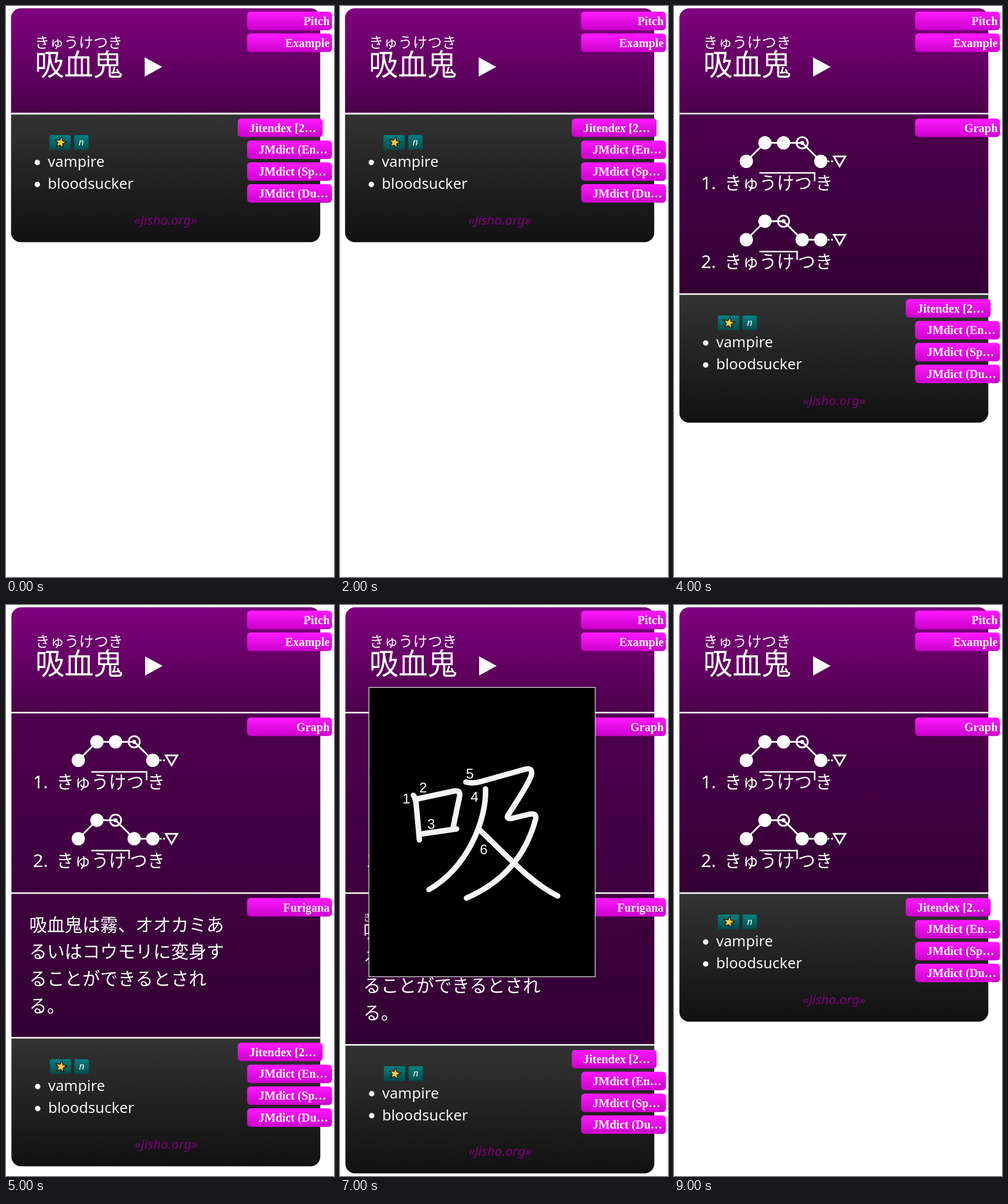
Write an HTML page with a canvas that moves like this. It is 568 px wide and 987 px high and loops after 10000 ms.

```html
<!DOCTYPE html>
<html lang="ja">
<head>
<meta charset="utf-8">
<title>Dictionary card</title>
<style>
html, body { margin: 0; width: 100%; height: 100%; overflow: hidden; background: #fff; }
canvas { display: block; width: 568px; height: 987px; }
</style>
</head>
<body>
<canvas id="stage" width="568" height="987"></canvas>
<script>
const ctx = document.getElementById('stage').getContext('2d');
const JP = '"Noto Sans CJK JP", "Noto Sans CJK", sans-serif';
const LATIN = '"Noto Sans", sans-serif';
const SERIF = '"Liberation Serif", serif';
const SANS = '"Liberation Sans", sans-serif';

// One state per second; "end" is the line above the definitions.
const closed = { end: 186, x: 8.5 };
const pitch = { end: 366, x: 9.2, pitch: true };
const graph = { ...pitch, end: 498, graph: true };
const example = { ...graph, end: 748, example: true };
const ruby = { ...example, end: 759.3, ruby: true };
const strokes = { ...ruby, end: 760.3, popup: true };
const timeline = [closed, closed, closed, pitch, graph, example, ruby, strokes, ruby, graph];

function vertical(y0, y1, from, to) {
  const g = ctx.createLinearGradient(0, y0, 0, y1);
  g.addColorStop(0, from);
  g.addColorStop(1, to);
  return g;
}

function text(str, x, y, font, color = '#fff', align = 'left') {
  ctx.font = font;
  ctx.fillStyle = color;
  ctx.textAlign = align;
  ctx.fillText(str, x, y);
}

// Japanese text centred vertically on cy
function kana(str, x, cy, size) {
  text(str, x, cy + size * 0.38, `${size}px ${JP}`);
}

function box(x, y, w, h, r, fill) {
  ctx.beginPath();
  ctx.roundRect(x, y, w, h, r);
  ctx.fillStyle = fill;
  ctx.fill();
}

function dot(x, y, r) {
  ctx.beginPath();
  ctx.arc(x, y, r, 0, Math.PI * 2);
  ctx.fillStyle = '#fff';
  ctx.fill();
}

function stroke(path, width, color = '#fff') {
  ctx.lineWidth = width;
  ctx.strokeStyle = color;
  ctx.stroke(new Path2D(path));
}

function tab(label, y, x = 417.5) {
  box(x, y, 147, 32, 6, vertical(y, y + 32, '#ff1aff', '#cc00cc'));
  const font = `bold 20.4px ${SERIF}`;
  if (label.endsWith('…')) text(label, x + 20, y + 23, font);
  else text(label, 560.5, y + 23, font, '#fff', 'right');
}

function divider(y) {
  ctx.fillStyle = '#fff';
  ctx.fillRect(0, y - 1.3, 536, 2.6);
}

function header() {
  ctx.fillStyle = vertical(4, 186, '#800080', '#4a004a');
  ctx.fillRect(0, 4, 536, 182);
  kana('きゅうけつき', 41.5, 62, 25.3);
  kana('吸血鬼', 41.5, 101, 50.6);
  ctx.fillStyle = '#fff';
  ctx.fill(new Path2D('M231.7 88.8L262 105.3L231.7 122Z'));
}

function pitchGraph(top, levels, drop) {
  const pts = levels.map((v, i) => [116 + i * 32.25, top + (v ? 0 : 32)]);
  const end = pts[pts.length - 1];
  stroke('M' + pts.map(p => p.join(' ')).join('L'), 3);
  ctx.setLineDash([3, 3]);
  stroke(`M${end[0] + 12} ${end[1]}H267`, 3);
  ctx.setLineDash([]);
  stroke(`M267.5 ${top + 23.5}H287.5L277.5 ${top + 40.5}Z`, 3);
  pts.forEach(([x, y], i) => {
    if (i !== drop) return dot(x, y, 11.5);
    ctx.beginPath();
    ctx.arc(x, y, 9.7, 0, Math.PI * 2);
    ctx.lineWidth = 3;
    ctx.strokeStyle = '#fff';
    ctx.stroke();
    dot(x, y, 3.5);
  });
}

function reading(n, cy, high, low) {
  const size = 30.3, left = 78 + 2 * size;
  const right = left + high.length * size + 6;
  text(n + '.', 37.5, cy + 11.5, `31px ${LATIN}`);
  kana('きゅ', 78, cy, size);
  kana(high, left, cy, size);
  kana(low, right, cy, size);
  stroke(`M${left} ${cy - 16.5}H${right - 1.2}V${cy - 2}`, 2.5);
}

function pitchSection(s) {
  const rise = s.graph ? 0 : 66;
  if (s.graph) {
    pitchGraph(236.5, [0, 1, 1, 1, 0], 3);
    pitchGraph(372, [0, 1, 1, 0, 0], 2);
  }
  reading(1, 305 - rise, 'うけつ', 'き');
  reading(2, 441 - 2 * rise, 'うけ', 'つき');
}

function exampleSection(s) {
  const size = 30.7, x = 31;
  const top = s.end - (s.ruby ? 196.5 : 196);
  ['吸血鬼は霧、オオカミあ', 'るいはコウモリに変身す', 'ることができるとされ', 'る。']
    .forEach((line, i) => kana(line, x, top + i * 46.7, size));
  if (s.ruby) {
    const half = size / 2;
    kana('きゅうけつき', x, top - 24, half);
    kana('きり', x + 4 * size, top - 24, half);
    kana('へんしん', x + 8 * size, top + 23, half);
  }
  divider(498);
}

function star(x, y) {
  ctx.beginPath();
  for (let i = 0; i < 10; i++) {
    const r = i % 2 ? 3.7 : 8.5, a = i * Math.PI / 5 - Math.PI / 2 + 0.2;
    ctx.lineTo(x + r * Math.cos(a), y + r * Math.sin(a));
  }
  ctx.closePath();
  ctx.lineWidth = 2.6;
  ctx.strokeStyle = '#111';
  ctx.stroke();
  ctx.fillStyle = '#ffc83d';
  ctx.fill();
}

function definitions(y) {
  ctx.fillStyle = vertical(y, y + 222, '#333', '#111');
  ctx.fillRect(0, y, 536, 223);
  const teal = vertical(y + 37, y + 62, '#008080', '#004d4d');
  box(66.7, y + 37, 37, 25.5, 3, teal);
  box(109.5, y + 37, 25, 25.5, 3, teal);
  star(86, y + 50);
  text('n', 122, y + 55, `italic 16px ${LATIN}`, '#fff', 'center');
  ['vampire', 'bloodsucker'].forEach((word, i) => {
    const cy = y + 84.5 + i * 38;
    dot(45.7, cy, 4.7);
    text(word, 63.7, cy + 7.8, `25.7px ${LATIN}`, '#f5f5f5');
  });
  text('«Jisho.org»', 268, y + 191.5, `italic 22.5px ${LATIN}`, '#800080', 'center');
}

function popup() {
  ctx.fillStyle = '#000';
  ctx.fillRect(50, 142.5, 392, 500);
  ctx.lineWidth = 1.3;
  ctx.strokeStyle = '#ddd';
  ctx.strokeRect(50, 142.5, 392, 500);
  ctx.lineCap = ctx.lineJoin = 'round';
  [
    'M127 329Q131 333 132 345L137.5 406',
    'M130 336L198 321.5Q209 320 207 331L196 384',
    'M139 396L202 387',
    'M252 318C254 370 222 453 154 492',
    'M218 306Q230 309 243 305.5L320 284Q335 280 331 295Q326 310 291 363Q287 370 297 369L326 362Q343 358 338 373C322 430 285 478 219 506.5',
    'M241 388C290 434 330 480 377 503'
  ].forEach(d => stroke(d, 9.5, '#f5f5f5'));
  ctx.lineCap = 'butt';
  ctx.lineJoin = 'miter';
  [[115, 334], [144, 315.5], [158, 378], [233, 331], [225, 291], [249, 422]]
    .forEach(([x, y], i) => text(i + 1, x, y + 8.5, `24px ${SANS}`, '#fff', 'center'));
}

function draw(s) {
  ctx.fillStyle = '#fff';
  ctx.fillRect(0, 0, 568, 987);

  ctx.save();
  ctx.translate(s.x, 0);
  ctx.beginPath();
  ctx.roundRect(0, 4, 544.3 - s.x, s.end + 218.3, 17);
  ctx.clip();
  header();
  if (s.pitch) {
    ctx.fillStyle = vertical(186, s.end, '#4d004d', '#330033');
    ctx.fillRect(0, 186, 536, s.end - 186);
    pitchSection(s);
  }
  if (s.example) exampleSection(s);
  definitions(s.end);
  divider(186);
  divider(s.end);
  ctx.restore();

  tab('Pitch', 9.7);
  tab('Example', 47.6);
  if (s.pitch) tab('Graph', 194.5);
  if (s.example) tab('Furigana', 506.5);
  ['Jitendex [2…', 'JMdict (En…', 'JMdict (Sp…', 'JMdict (Du…']
    .forEach((name, i) => tab(name, s.end + 8.6 + i * 37.8, i ? 417.5 : 401.3));
  if (s.popup) popup();
}

const start = performance.now();
function tick() {
  const t = Math.max(0, performance.now() - start) % 10000;
  draw(timeline[Math.floor(t / 1000)]);
  requestAnimationFrame(tick);
}
tick();
</script>
</body>
</html>
```
